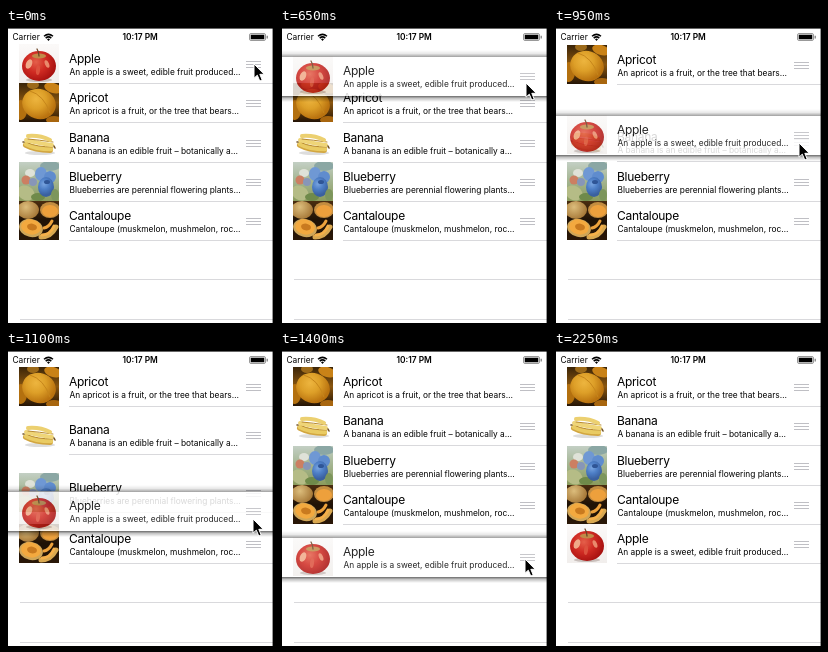
These frames come from a looping animation (268x295 px, 2.3 s). An HTML page with a canvas:

```html
<!DOCTYPE html>
<html lang="en">
<head>
<meta charset="utf-8">
<title>Reorder list</title>
<style>
html, body { margin: 0; width: 100%; height: 100%; overflow: hidden; background: #fff; }
#stage { position: absolute; left: 0; top: 0; width: 268px; height: 295px; overflow: hidden; background: #fff; color: #000; font-family: Inter, "Liberation Sans", sans-serif; }
#stage * { position: absolute; white-space: nowrap; }
.status { top: 3px; font-size: 8.4px; line-height: 12px; }
.row { left: 2px; width: 265px; height: 40px; }
.row canvas { left: 11px; top: 0; width: 40px; height: 39px; }
.title { left: 61px; top: 7px; font-size: 12px; line-height: 16px; letter-spacing: -.3px; }
.note { left: 61.5px; top: 22px; font-size: 8.35px; line-height: 12px; }
.grip { left: 238px; top: 17px; width: 15px; height: 7px; background: repeating-linear-gradient(#bfbfc4 0 1px, #fff0 1px 3px); }
.line { right: 0; height: 1px; background: #d9d9dc; }
.row .line { left: 61px; top: 39px; }
.shade { left: 0; width: 265px; opacity: 0; }
.over { top: -6px; height: 7px; background: linear-gradient(#0000, #0000001a 50%, #00000070); }
.under { top: 40px; height: 6px; background: linear-gradient(#000000b0, #00000045 40%, #0000); }
.edge { background: #000; z-index: 2; }
svg { left: 0; top: 0; overflow: visible; }
#cursor { z-index: 3; }
</style>
</head>
<body>
<div id="stage">
  <div class="line" style="left:14px;top:251px"></div>
  <div class="line" style="left:14px;top:291px"></div>
  <div id="list"></div>
  <span class="status" style="left:6.5px">Carrier</span>
  <span class="status" style="left:116.5px;font-weight:600">10:17 PM</span>
  <svg width="268" height="16" fill="none" stroke="#000" stroke-width="1.5">
    <path d="M38 8.3Q42.5 4.5 47 8.3M39.7 10.1Q42.5 7.7 45.3 10.1"/>
    <path d="M41 11.2Q42.5 10 44 11.2L42.5 12.9Z" fill="#000" stroke="none"/>
    <rect x="243.5" y="5.5" width="16" height="7" rx="1.5" stroke="#999" stroke-width="1"/>
    <rect x="245" y="7" width="13" height="4" fill="#000" stroke="#000" stroke-width=".6"/>
    <path d="M261.2 7.8v2.6" stroke="#777" stroke-width="1.2"/>
  </svg>
  <div class="edge" style="left:0;top:0;width:2px;height:295px"></div>
  <div class="edge" style="left:267px;top:0;width:1px;height:295px"></div>
  <div class="edge" style="left:266px;top:0;width:1px;height:295px;opacity:.4"></div>
  <div class="edge" style="left:0;top:0;width:268px;height:1px;opacity:.6"></div>
  <svg id="cursor" width="14" height="20">
    <path d="M0 0V14.2L3.3 11.2L5.8 17L8.2 16L5.8 10.3H10.2Z" fill="#000" stroke="#fff" stroke-width="1"/>
  </svg>
</div>
<script>
const LOOP = 2300, STEP = 50, TOP = 15.9, PITCH = 39.3;

// Thumbnail painting helpers
function oval(c, x, y, rx, ry, fill, turn = 0) {
  c.fillStyle = fill;
  c.beginPath();
  c.ellipse(x, y, rx, ry, turn, 0, Math.PI * 2);
  c.fill();
}

function glow(c, x, y, r, ...colors) {
  const g = c.createRadialGradient(x, y, 0, x, y, r);
  colors.forEach((color, i) => g.addColorStop(i / (colors.length - 1), color));
  return g;
}

function fall(c, ...colors) {
  const g = c.createLinearGradient(0, 0, 0, 39);
  colors.forEach((color, i) => g.addColorStop(i / (colors.length - 1), color));
  return g;
}

function fill(c, color) {
  c.fillStyle = color;
  c.fillRect(0, 0, 40, 40);
}

function curve(c, color, width, path) {
  c.strokeStyle = color;
  c.lineWidth = width;
  c.lineCap = 'round';
  c.stroke(new Path2D(path));
}

function apple(c) {
  fill(c, fall(c, '#fbf9f8', '#f1eeec'));
  oval(c, 20, 36, 13, 2, '#c9bfbb');
  oval(c, 20, 22, 17, 15, glow(c, 17, 18, 21, '#e4604a', '#cf2a22', '#a5100f'));
  oval(c, 20, 12, 7, 2.4, '#c08a48');
  oval(c, 10, 20, 3, 5, '#f0a988', .4);
  oval(c, 28, 20, 2, 4, '#e98a6c', -.4);
  oval(c, 19, 26, 2, 5, '#dc523e', .1);
  curve(c, '#6b4425', 1.3, 'M20 12Q20 8 18 5');
}

function apricot(c) {
  fill(c, fall(c, '#3a2408', '#8a560f', '#241405'));
  oval(c, 34, 5, 9, 5, '#c98217', .3);
  oval(c, 14, 2, 6, 4, '#9c6a1a');
  oval(c, 2, 27, 6, 10, '#b3700f');
  oval(c, 35, 37, 8, 4, '#a8660f');
  oval(c, 20, 21, 17, 15, glow(c, 17, 16, 20, '#edb53f', '#dd9f28', '#b9720f'), .3);
  curve(c, '#c6861b', 1, 'M11 8Q25 12 31 30');
}

function banana(c) {
  fill(c, '#fff');
  oval(c, 21, 30, 15, 2, '#ddd');
  curve(c, '#d2a640', 6, 'M7 22Q16 27 31 27');
  curve(c, '#e9cb63', 4.5, 'M7 21Q16 26 32 26');
  curve(c, '#b78a32', 1, 'M9 20Q18 24 34 24');
  curve(c, '#efd578', 4, 'M7 17Q18 20 33 22');
  curve(c, '#b78a32', 1, 'M9 16Q20 17 34 19');
  curve(c, '#ecd070', 4, 'M9 13Q21 12 31 17');
  curve(c, '#75572a', 1.6, 'M5 19L4 19M35 23L36 25');
}

function blueberry(c) {
  fill(c, fall(c, '#c3cfc4', '#a3b48f', '#8a9b5c'));
  oval(c, 31, 4, 10, 5, '#8ba7a4');
  oval(c, 7, 31, 9, 7, '#b5bc86', .5);
  oval(c, 19, 35, 7, 4, '#6f8a4a');
  oval(c, 11, 11, 5, 4, '#dfe2d8');
  oval(c, 7, 18, 4.5, 4.5, '#cc7f62');
  oval(c, 14, 20, 4, 4, '#8796b8');
  oval(c, 22, 12, 6, 7, '#6f98d4');
  oval(c, 31, 15, 6, 6, '#5f8cce');
  oval(c, 27, 25, 8, 10, glow(c, 25, 22, 11, '#78a4e0', '#4d7ec6', '#3a609f'));
  oval(c, 28, 20, 3, 2, '#2f5596');
  oval(c, 36, 33, 4, 6, '#7d965c');
}

function cantaloupe(c) {
  fill(c, fall(c, '#4a2d10', '#1f1206', '#2a1707'));
  oval(c, 9, 9, 11, 9, glow(c, 7, 6, 13, '#dcbd7c', '#a67838'));
  oval(c, 31, 9, 10, 8, '#c38d40');
  oval(c, 31, 10, 8, 6, '#eda03c');
  oval(c, 12, 27, 12, 9, '#cfa658', .2);
  oval(c, 12, 26, 10, 7.5, '#f3a93f', .2);
  oval(c, 13, 26, 5, 3.4, '#c97a1f', .2);
  curve(c, '#d9a850', 5, 'M22 36Q32 36 37 26');
  curve(c, '#f5b04a', 3, 'M23 34Q31 34 35 25');
  curve(c, '#eda23c', 3, 'M25 27Q30 26 33 20');
}

const fruits = [
  ['Apple', 'An apple is a sweet, edible fruit produced…', apple],
  ['Apricot', 'An apricot is a fruit, or the tree that bears…', apricot],
  ['Banana', 'A banana is an edible fruit – botanically a…', banana],
  ['Blueberry', 'Blueberries are perennial flowering plants…', blueberry],
  ['Cantaloupe', 'Cantaloupe (muskmelon, mushmelon, roc…', cantaloupe]
];

const list = document.getElementById('list');
const cursor = document.getElementById('cursor');

function add(parent, tag, cls, text = '') {
  const el = document.createElement(tag);
  el.className = cls;
  el.textContent = text;
  return parent.appendChild(el);
}

const rows = fruits.map(([name, note, paint]) => {
  const row = add(list, 'div', 'row');
  const thumb = add(row, 'canvas', '');
  const ratio = window.devicePixelRatio || 1;
  thumb.width = 40 * ratio;
  thumb.height = 39 * ratio;
  const c = thumb.getContext('2d');
  c.scale(ratio, ratio);
  paint(c);
  add(row, 'span', 'title', name);
  add(row, 'span', 'note', note);
  add(row, 'div', 'grip');
  add(row, 'div', 'line');
  return row;
});
const dragged = rows[0];
dragged.style.zIndex = 1;
const draggedLine = dragged.querySelector('.line');
const shades = ['over', 'under'].map(side => add(dragged, 'div', 'shade ' + side));

// Motion: [time, value...]
const dragPath = [[300, 0], [450, 2], [600, 6], [720, 20], [850, 47.5], [940, 67],
  [1014, 96], [1100, 124], [1200, 150], [1300, 165], [1400, 170], [1800, 170]];
const cursorPath = [[0, 248, 36], [300, 247, 37], [450, 247, 41], [600, 246, 48],
  [720, 246, 64], [850, 245, 90], [940, 245, 111], [1014, 246, 140], [1100, 247, 168],
  [1200, 247, 191], [1300, 246, 204], [1400, 245, 208], [1700, 244, 207],
  [1850, 243, 205], [2000, 244, 200], [2100, 250, 165], [2200, 259, 111]];
const swapStarts = [739, 940, 1008, 1115], SWAP = 240;

const clamp = x => Math.min(1, Math.max(0, x));
const ease = x => x < .5 ? 2 * x * x : 1 - 2 * (1 - x) ** 2;
const progress = (t, start, length) => ease(clamp((t - start) / length));

function along(path, t) {
  let i = 1;
  while (i < path.length - 1 && path[i][0] < t) i++;
  const a = path[i - 1], b = path[i];
  const k = clamp((t - a[0]) / (b[0] - a[0]));
  return a.slice(1).map((v, j) => v + (b[j + 1] - v) * k);
}

function place(el, x, y) {
  el.style.transform = `translate(${Math.round(x)}px, ${Math.round(y)}px)`;
}

function draw(t) {
  const drop = progress(t, 1800, 300);
  const lift = progress(t, 150, 200) * (1 - drop);
  const [drag] = along(dragPath, t);
  place(dragged, 0, TOP + drag + (4 * PITCH - drag) * drop);
  dragged.style.background = lift > 0 ? '#fff' : 'none';
  dragged.style.opacity = 1 - .15 * lift;
  draggedLine.style.opacity = lift > 0 ? 0 : 1;
  shades.forEach(s => s.style.opacity = lift);

  swapStarts.forEach((start, i) =>
    place(rows[i + 1], 0, TOP + PITCH * (i + 1 - progress(t, start, SWAP))));

  place(cursor, ...along(cursorPath, t));
  cursor.style.visibility = t < 2250 ? 'visible' : 'hidden';
}

function tick() {
  const t = performance.now() % LOOP;
  draw(Math.floor(t / STEP) * STEP);
  requestAnimationFrame(tick);
}
tick();
</script>
</body>
</html>
```
